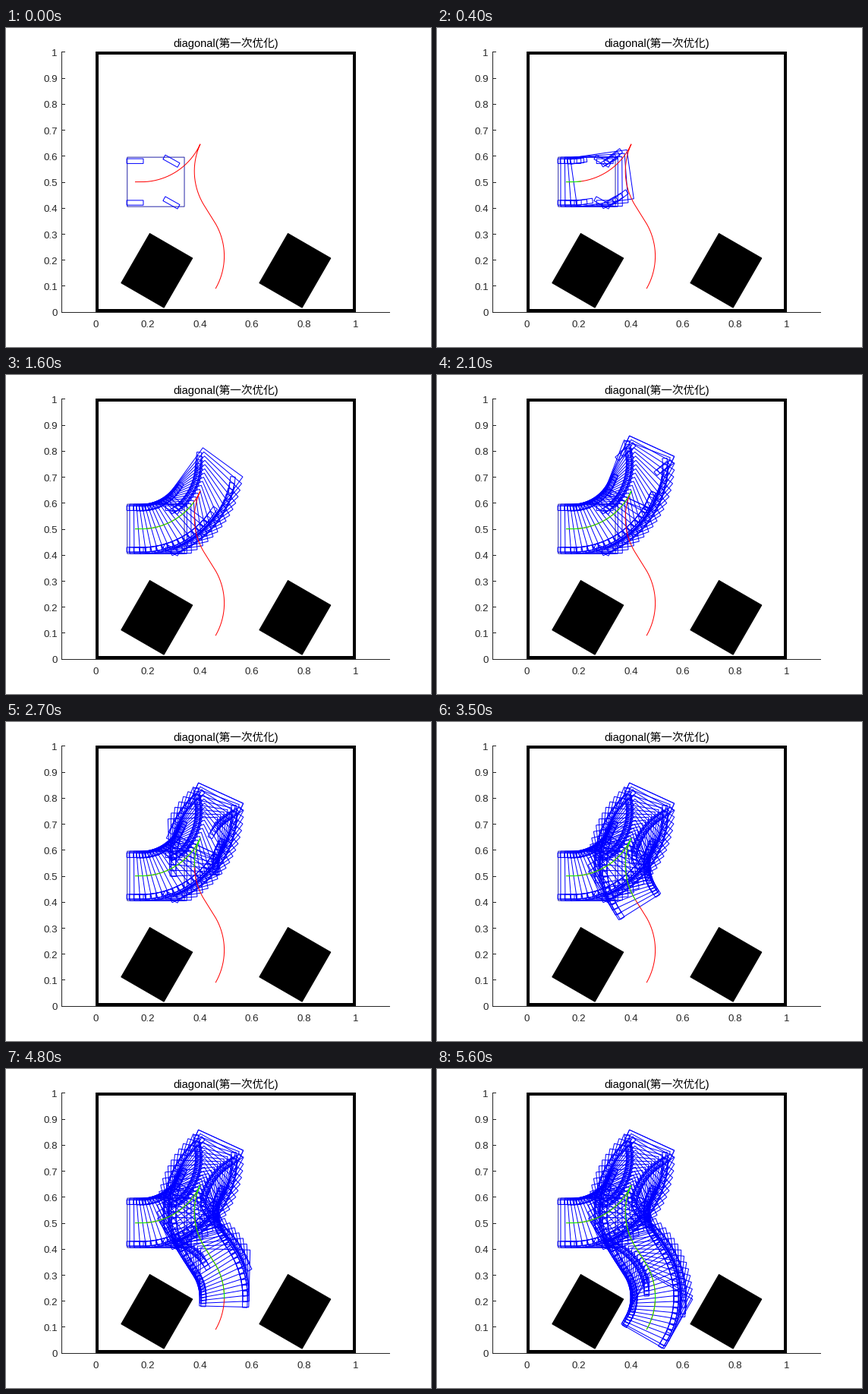
Animation, 560 px wide and 420 px high, one loop 6.7 s. Source, as a matplotlib script:

```python
import numpy as np
import matplotlib.pyplot as plt
from matplotlib.animation import FuncAnimation
from matplotlib.patches import Polygon, Rectangle

W, H, DPI = 560, 420, 100
PX = 72 / DPI                           # one pixel in points
X0, Y0, UNIT = 118.65, 373.8, 342.3     # world origin and scale on the stage
BLUE, INK = "#0000ff", "#262626"

plt.rcParams["font.family"] = ["Liberation Sans", "Noto Sans CJK JP"]

fig = plt.figure(figsize=(W / DPI, H / DPI), dpi=DPI, facecolor="white")
ax = fig.add_axes([0, 0, 1, 1])
ax.set_xlim(0, W)
ax.set_ylim(H, 0)
ax.axis("off")

# Path pieces: length, curvature, gear
R = 0.25
CUSP, LEAN, FINAL = np.radians([65.36, 122.2, 60])
PIECES = [
    (0.024, 0, 1),
    (R * CUSP, 1 / R, 1),
    (R * (LEAN - CUSP), 1 / R, -1),
    (0.0716, 0, -1),
    (R * (LEAN - FINAL), -1 / R, -1),
]
TOTAL = sum(p[0] for p in PIECES)
FORWARD = PIECES[0][0] + PIECES[1][0]
STEP = 0.01665
POSES, TURN = 57, 19                    # pose count, last forward pose
BASE = 0.14                             # wheelbase
STEER = np.arctan(BASE / R)
BERTH, GAP = (0.46, 0.0898), 0.266      # parking spot and spacing


def pose(s):
    """Rear axle position, heading and steering after distance s."""
    x, y, th = 0.15, 0.5, 0.0
    for i, (length, k, gear) in enumerate(PIECES):
        d = min(s, length)
        if k:
            end = th + k * d
            x += gear * (np.sin(end) - np.sin(th)) / k
            y += gear * (np.cos(th) - np.cos(end)) / k
            th = end
        else:
            x += gear * d * np.cos(th)
            y += gear * d * np.sin(th)
        if s <= length or i == len(PIECES) - 1:
            return x, y, th, STEER * np.sign(k * gear)
        s -= length


def distance(n):
    """Equal steps counted from the cusp, so the outer steps are short."""
    if n <= TURN:
        return max(FORWARD - (TURN - n) * STEP - 1e-6, 0)
    return min(FORWARD + (n - TURN - 1) * STEP + 1e-6, TOTAL)


def stage(x, y):
    return X0 + UNIT * np.asarray(x), Y0 - UNIT * np.asarray(y)


def spin(pts, a):
    c, s = np.cos(a), np.sin(a)
    return pts @ np.array([[c, s], [-s, c]])


def box(x1, x2, half):
    return np.array([(x1, -half), (x2, -half), (x2, half), (x1, half), (x1, -half)])


BODY = box(-0.03, 0.19, 0.095)
WHEEL = box(-0.032, 0.032, 0.0092)


def thin(x, y, color, z):
    return ax.plot(*stage(x, y), color=color, lw=PX, zorder=z, snap=False,
                   solid_joinstyle="miter", solid_capstyle="butt")[0]


def route(a, b, count):
    return np.array([pose(s)[:2] for s in np.linspace(a, b, count)]).T


def car(n):
    x, y, th, steer = pose(distance(n))
    if n == 0:
        steer = -STEER
    wheels = []
    for along, turn in ((0, 0), (BASE, steer)):
        for side in (0.08, -0.08):
            wheels += [spin(WHEEL, turn) + (along, side), [(np.nan, np.nan)]]
    shade = "#2828a8" if n == 0 else BLUE
    parts = []
    for pts, color in ((BODY, shade), (np.vstack(wheels), BLUE)):
        p = spin(pts, th) + (x, y)
        parts.append(thin(p[:, 0], p[:, 1], color, 3 + n * 0.01))
    return parts


def axis_line(xs, ys):
    ax.plot(xs, ys, color=INK, lw=PX, snap=False, zorder=1,
            solid_capstyle="butt")


def label(x, y, text, ha):
    ax.text(x, y, text, color=INK, fontsize=13.33 * PX, ha=ha,
            va="center_baseline")


# Axes
axis_line([73, 506], [374.5, 374.5])
axis_line([73.5, 73.5], [31, 375])
for i in range(11):
    y = Y0 - UNIT * i / 10
    row = np.floor(y + 0.4) + 0.5
    axis_line([73, 78], [row, row])
    label(67.8, y + 1, f"{i / 10:g}", "right")
for i in range(6):
    x = X0 + UNIT * i / 5
    label(x, 389, f"{i / 5:g}", "center")
ax.text(289.8, 25, "diagonal(第一次优化)", color="black",
        fontsize=14.67 * PX, ha="center", va="baseline")

# Room and parked blocks
ax.add_patch(Rectangle((120, 33), 339, 339, fill=False, ec="black",
                       lw=4 * PX, joinstyle="miter", snap=False, zorder=2))
for shift in (-GAP, GAP):
    p = spin(BODY, FINAL) + BERTH + np.array([shift, 0])
    ax.add_patch(Polygon(np.column_stack(stage(*p.T)), fc="black", ec="black",
                         lw=PX, snap=False, zorder=2))

thin(*route(0, TOTAL, 400), "#ff0000", 5)
done = thin([], [], "#00ff00", 6)
cars = [car(n) for n in range(POSES)]


def update(n):
    for i, parts in enumerate(cars):
        for part in parts:
            part.set_visible(i <= n)
    s = distance(min(n, POSES - 1))
    done.set_data(*stage(*route(0, s, 300)))
    return []


anim = FuncAnimation(fig, update, frames=67, interval=100, repeat=True,
                     repeat_delay=0, blit=False)
plt.show()
```
